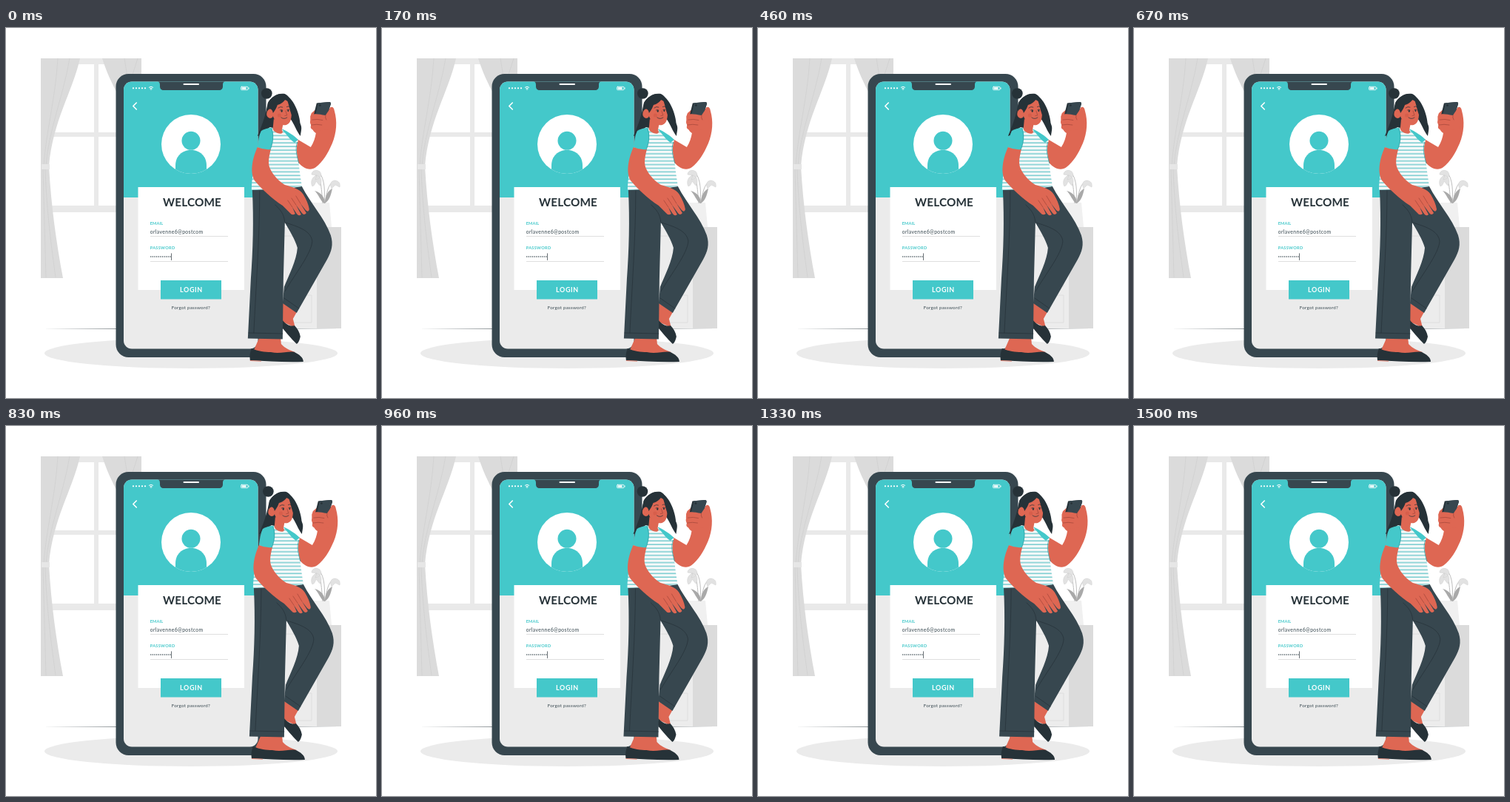
An HTML page for the animation above (1.54 s loop, 500 by 500 pixels).

```html
<!DOCTYPE html>
<html lang="en">
<head>
<meta charset="utf-8">
<title>Welcome</title>
<style>
  html, body { margin: 0; width: 100%; height: 100%; overflow: hidden; background: #fff; }
  svg { display: block; width: 100vw; height: 100vh; }
  text { font-family: Lato, sans-serif; }
  .teal { fill: #44c8ca; }
  .dark { fill: #37474f; }
  .ink { fill: #263238; }
  .skin { fill: #de6753; }
  .line { fill: none; stroke: #263238; stroke-width: .7; stroke-linecap: round; stroke-linejoin: round; }
  .white { fill: none; stroke: #fff; stroke-linecap: round; stroke-linejoin: round; }
  .crease { fill: none; stroke: #a94a3d; stroke-width: .8; stroke-linecap: round; }
</style>
</head>
<body>
<svg viewBox="0 0 500 500">
  <defs>
    <clipPath id="screen"><rect x="159" y="72.5" width="181.5" height="361" rx="11"/></clipPath>
    <clipPath id="avatar"><circle cx="250" cy="157" r="40"/></clipPath>
    <pattern id="stripes" width="10" height="4.9" y="1.2" patternUnits="userSpaceOnUse">
      <rect width="10" height="4.9" fill="#f7f9f9"/>
      <rect y="1.5" width="10" height="1.3" fill="#62c5c8"/>
    </pattern>
  </defs>

  <g id="window">
    <path fill="#e9e9e9" d="M56 41H170V49H125V141H150V147H125V240H150V249H60V240H119V147H60V141H119V49H56Z"/>
    <path fill="#dbdbdb" d="M47 41H100C90 86 63 126 58 187C61 240 68 290 77 338H47Z"/>
    <path fill="#dbdbdb" d="M130 41H183V120H168C157 99 141 76 130 41Z"/>
    <path fill="none" stroke="#cfcfcf" stroke-width=".7" d="M86 41C78 90 57 140 54 186M70 41C67 95 54 140 51 186M53 191C55 250 62 300 67 337M50 191L54 337M178 41L170 66M160 41L164 66"/>
    <path fill="#e6e6e6" d="M48 184H59V191H48Z"/>
  </g>

  <g id="cabinet">
    <path fill="#ececec" d="M372 269H421V406H372Z"/>
    <path fill="#dbdbdb" d="M420 269H453V406H420Z"/>
    <path fill="none" stroke="#dedede" d="M372 281H413V349H372M372 361H413V398H372"/>
    <path fill="#f0f0f0" d="M404 236H437L440 269H401Z"/>
    <path fill="none" stroke="#bdbdbd" d="M428 237C426 220 427 203 418 199M430 237C431 221 431 204 423 195M431 237C434 219 436 209 445 207"/>
    <path fill="#a9a9a9" d="M430 237C425 234 422 224 417 220C426 222 431 229 431 237C431 226 436 219 441 217C439 226 437 234 430 237Z"/>
    <path fill="#e2e2e2" stroke="#cfcfcf" stroke-width=".5" d="M420 199C413 201 411 209 414 214C417 213 418 210 419 207L424 213C428 207 426 201 420 199ZM424 194C418 190 413 194 413 198L420 199L418 205C425 204 428 199 424 194ZM445 206C439 206 437 211 440 217L445 212L451 215C452 210 450 207 445 206Z"/>
  </g>

  <ellipse cx="250" cy="439.5" rx="198" ry="20.5" fill="#ebebeb"/>
  <path class="ink" d="M50 406.4L250 405.9L450 406.4L250 407.1Z"/>

  <g id="phone">
    <rect class="dark" x="148.5" y="62" width="203" height="383" rx="17"/>
    <g clip-path="url(#screen)">
      <path fill="#ebebeb" d="M159 72H341V434H159Z"/>
      <path class="teal" d="M159 72H341V229H159Z"/>
      <path class="dark" d="M203 72H298C294 72 293 74 293 77V79C293 82 291 84 288 84H213C210 84 208 82 208 79V77C208 74 207 72 203 72Z"/>
    </g>
    <path class="white" stroke-width="2" d="M240.500 76H260"/>
    <path class="white" stroke-width="2.3" stroke-dasharray="0 4" d="M172 81.300H188.500"/>
    <path class="white" stroke-width="1" d="M193.400 80.200Q196 78 198.600 80.200M194.700 81.800Q196 80.600 197.300 81.800"/>
    <circle cx="196" cy="83" r=".8" fill="#fff"/>
    <rect class="white" x="317.500" y="79.300" width="9.500" height="4.400" rx="1" stroke-width=".8"/>
    <path fill="#fff" d="M318.500 80.200H324.500V82.800H318.500ZM327.500 80.500H328.500V82.500H327.500Z"/>
    <path class="white" stroke-width="1.6" d="M176.300 101L171.800 105.500L176.300 110"/>

    <circle cx="250" cy="157" r="40" fill="#fff"/>
    <g class="teal" clip-path="url(#avatar)">
      <circle cx="250" cy="152.300" r="12.500"/>
      <path d="M229 200V186C229 173 238 165 250 165S271 173 271 186V200Z"/>
    </g>

    <path fill="#fff" d="M178.500 215H322V354H178.500Z"/>
    <path class="teal" d="M209 341H291V366.500H209Z"/>
    <path fill="none" stroke="#d2d2d2" stroke-width=".7" d="M195 281.500H300M195 315.500H300"/>
    <text class="ink" x="212" y="241" font-size="15.300" font-weight="700" letter-spacing=".15">WELCOME</text>
    <text class="teal" x="194.700" y="265.800" font-size="5.600" font-weight="700" letter-spacing=".15">EMAIL</text>
    <text class="dark" x="194.700" y="278.300" font-size="6.800" letter-spacing=".4">orlavenne6@postcom</text>
    <text class="teal" x="194.700" y="299.300" font-size="5.600" font-weight="700" letter-spacing=".3">PASSWORD</text>
    <path fill="none" stroke="#37474f" stroke-width="1.600" stroke-linecap="round" stroke-dasharray="0 2.600" d="M195.800 309H222"/>
    <path class="line" d="M223.500 304.800V313.500"/>
    <text x="235" y="357.400" font-size="9" font-weight="700" letter-spacing=".6" fill="#fff">LOGIN</text>
    <text class="dark" x="223.700" y="380.200" font-size="6.200" letter-spacing=".28">Forgot password?</text>
  </g>

  <g id="woman">
    <g id="hair-back" class="ink">
      <circle cx="352.500" cy="88.500" r="7.300"/>
      <path d="M377 89C366 87 355 95 353 106C350 122 345 134 340 146C348 143 357 140 366 136L384 122C390 130 393 140 398 146C399 138 401 134 397 128C388 115 389 95 377 89Z"/>
    </g>

    <g id="back-leg">
      <path class="skin" d="M373 371L393 384L388 393L391 405L374 397Z"/>
      <path class="ink" d="M374 395C379 401 385 404 390 402C394 406 397 411 398 417C397 421 396 425 393 427C385 419 377 410 373 404Z"/>
      <path class="dark" d="M362 220L400 214C411 236 431 257 439 280C443 293 440 302 434 313L393 385L374 372L376 350C382 335 393 314 394 297C391 286 383 273 377 263Z"/>
      <path class="line" d="M378 263C393 268 412 273 414 288C413 305 391 332 377 356M376 365L396 379"/>
    </g>

    <g id="front-leg">
      <path class="skin" d="M344 415H371L372 427C377 433 385 436 391 438L370 444L333 440Z"/>
      <path class="ink" d="M332 433C341 437 350 438 358 438C371 441 382 436 390 438C396 441 402 445 402 451C376 452 354 450 330 449C329 443 330 438 332 433Z"/>
      <path fill="none" stroke="#de6753" stroke-width=".8" d="M330 449.500L345 450.200"/>
      <path class="dark" d="M333 219L384 215C379 231 378 248 377 263L375 340L374 420.500L327 419.500L331 340C334 299 335 260 333 219Z"/>
      <path class="line" d="M343 220C343 280 338 350 335 412M328 412L374 413M377 263C376 250 370 245 364 239"/>
    </g>

    <path id="far-arm" class="skin" d="M386 146L395 151L412 161C416 155 418 148 419 142C411 137 410 121 413 115L421 108L437 110C438 106 443 105 444 112C448 126 447 141 441 156C435 170 428 181 419 188C411 194 401 190 392 178Z"/>

    <g id="torso">
      <path fill="url(#stripes)" d="M357 134L374 138L395 152C391 163 394 174 396 185C397 196 399 206 400 214C378 216 355 219 332 219C333 191 340 159 346 141Z"/>
      <path class="teal" d="M372 136C382 140 390 146 395 151L390 155C383 150 379 143 372 136Z"/>
      <path class="teal" d="M345 139Q352 135 359 135C363 144 361 156 357 165Q347 165 340 161C341 153 342 145 345 139Z"/>
      <path class="skin" d="M362 123L375 128L373 138C376 142 372 144 367 142C362 140 360 137 361 134Z"/>
      <path fill="none" stroke="#289a9d" stroke-width=".7" d="M359 136C363 146 360 158 357 165M394 154C390 164 394 175 396 183"/>
    </g>

    <g id="near-arm">
      <path class="skin" d="M340 161Q349 165 358 164C355 176 354 183 357 190C361 199 369 207 377 212C387 215 397 217 402 225C406 232 409 238 410 245Q409 250 405 246L398 237L406 250Q403 254 400 250L392 239L399 252Q396 255 393 251L387 242L391 251Q387 254 384 250L374 240C360 231 345 217 336 206C329 194 334 174 340 161Z"/>
      <path class="crease" d="M398 237L392 227M392 239L386 230M387 242L381 233"/>
    </g>

    <g id="head">
      <path class="skin" d="M363 99C370 94 381 96 384 103C386 109 387 117 385 124C383 131 377 133 370 130C364 127 362 122 361 119C353 120 350 112 355 109C358 108 360 110 361 112Z"/>
      <path class="ink" d="M379 91C372 86 360 91 354 101L352 117C354 107 360 108 361 115C364 111 366 107 367 104C374 102 377 98 379 94C384 107 384 117 391 127L398 137C399 118 389 96 379 91Z"/>
      <path class="skin" d="M356 112C351 112 351 121 357 122C360 122 362 119 361 116C360 113 358 112 356 112Z"/>
      <path class="line" d="M368 108Q371 105.500 374 107M379.500 106.500Q381.500 105 383 106.500"/>
      <ellipse class="ink" cx="372.800" cy="112.300" rx="1" ry="1.500"/>
      <ellipse class="ink" cx="381.500" cy="111.800" rx=".9" ry="1.400"/>
      <path class="line" d="M370.500 111Q372.300 109.700 374 111M380 110.500Q381.500 109.500 383 110.500M372 121Q376 124 380 121"/>
      <path class="crease" d="M378 112L380 118L377 118.500"/>
      <circle cx="369.500" cy="118" r="2.500" fill="#cf5544" opacity=".5"/>
    </g>

    <g id="handset">
      <path class="ink" d="M420 101.500L437 100Q439.500 100 439 103L434 118L418 120.500Q415.500 120 416 117.500Z"/>
      <path class="dark" d="M422 101.300L437 100Q439.500 100 439 103L434 118L418 119.500Z"/>
      <circle class="ink" cx="424.500" cy="104.500" r="1.400"/>
      <path class="skin" d="M413 117.500C418 115 424 117 432 118C435 113 438 109 440 107C443 107 444 112 443 120L440 137L421 139C413 138 410 135 413 131C410 128 411 124 414 124C411 122 411 118 413 117.500Z"/>
      <path class="crease" d="M414 124Q421 122.500 428 124.500M413 131Q420 129.500 427 131M432 118Q431 121 433 124"/>
    </g>
  </g>
</svg>
<script>
  const woman = document.getElementById("woman");
  const LOOP = 1540, STEP = 1000 / 24, CYCLE = 1500, LEAD = 27;
  const shake = [0, -1, 2, -4, 4, -4, 4, -4, 2, -1, 0];

  // Linear side-to-side shake, advanced in 24 fps steps
  function offsetAt(ms) {
    const step = Math.floor((ms + 4) / STEP);
    const phase = (step * STEP + LEAD) % CYCLE / CYCLE * 10;
    const i = Math.floor(phase);
    return shake[i] + (shake[i + 1] - shake[i]) * (phase - i);
  }

  const start = performance.now();
  function draw() {
    const x = offsetAt((performance.now() - start) % LOOP);
    woman.setAttribute("transform", `translate(${x.toFixed(3)} 0)`);
    requestAnimationFrame(draw);
  }
  draw();
</script>
</body>
</html>
```
